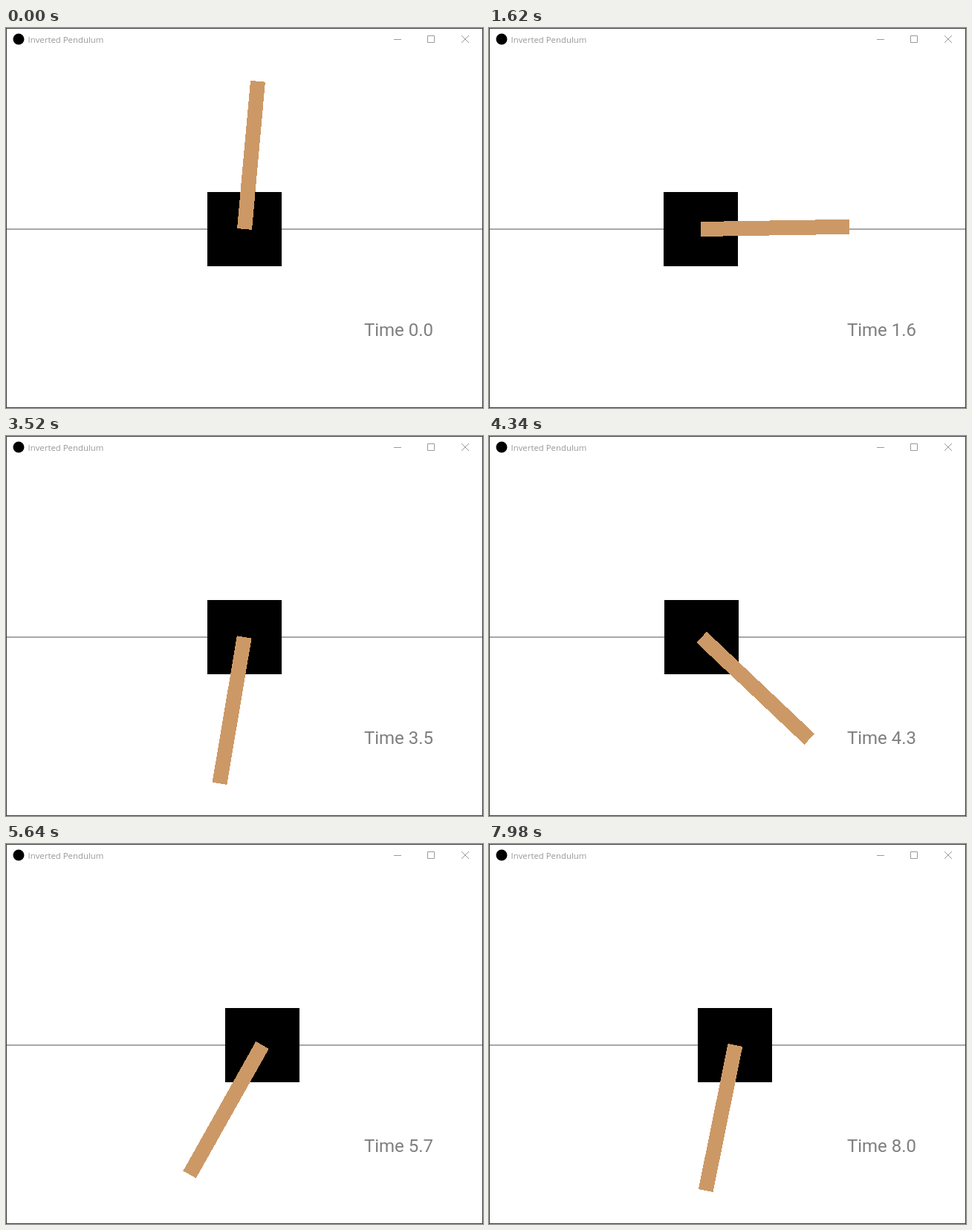
Animation, 642 px wide and 512 px high, one loop 8000 ms. Source, as an HTML page:

```html
<!DOCTYPE html>
<html lang="en">
<head>
<meta charset="utf-8">
<title>Inverted Pendulum</title>
<style>
  html, body { margin: 0; width: 100%; height: 100%; overflow: hidden; background: #fff; }
  svg { display: block; }
  .title { font: 11.4px "Open Sans", sans-serif; fill: #999; }
  .time { font: 24px Roboto, sans-serif; font-kerning: none; fill: #7f7f7f; }
  .outline { fill: none; stroke: #999; }
  .crisp { shape-rendering: crispEdges; }
</style>
</head>
<body>
<svg width="642" height="512" viewBox="0 0 642 512">
  <rect class="crisp" x=".5" y=".5" width="641" height="511" fill="#fff" stroke="#3c3c3c"/>
  <circle cx="17" cy="15" r="7.5"/>
  <text class="title" x="29.5" y="20">Inverted Pendulum</text>
  <path class="outline" d="M522 15.5h10M567.5 10.5h9v9h-9zM613 10l10 10M623 10l-10 10"/>
  <rect class="crisp" x="1" y="270" width="640" height="2" fill="#a8a8a4"/>
  <g id="cart" class="crisp">
    <rect x="-50" y="-50" width="100" height="100"/>
    <rect id="pole" x="-10" y="-200" width="20" height="200" fill="#cc9966"/>
  </g>
  <text id="time" class="time" x="481.9" y="415"></text>
</svg>
<script>
const LOOP = 8000;
const TICK = 20;              // ms, display clock
const TICKS_PER_POSE = 5.049;
const POSE = 0.10098;         // seconds of simulation per drawn pose
const SUBSTEPS = 200;

const LENGTH = 200;           // pole, px
const GRAVITY = 981;          // px/s² at 100 px per metre
const MASS_SHARE = 0.25;      // pole mass / total mass
const CART_DRAG = 0.43;       // 1/s
const POLE_DRAG = 0.45;       // 1/s
const START_ANGLE = 0.09;     // rad from upright

const cart = document.getElementById("cart");
const pole = document.getElementById("pole");
const time = document.getElementById("time");

// Damped pendulum on a free cart, starting at rest
function simulate(count) {
  const poses = [], dt = POSE / SUBSTEPS;
  let x = 0, v = 0, angle = START_ANGLE, spin = 0;
  for (let i = 0; i < count; i++) {
    poses.push({ x, angle });
    for (let j = 0; j < SUBSTEPS; j++) {
      const s = Math.sin(angle), c = Math.cos(angle);
      const torque = (GRAVITY * s + CART_DRAG * v * c) / LENGTH
                   - MASS_SHARE * spin * spin * s * c - POLE_DRAG * spin;
      const spinRate = torque / (1 - MASS_SHARE * c * c);
      const push = MASS_SHARE * LENGTH * (spin * spin * s - spinRate * c);
      v += (push - CART_DRAG * v) * dt;
      spin += spinRate * dt;
      x += v * dt;
      angle += spin * dt;
    }
  }
  return poses;
}

const poses = simulate(80);

function draw() {
  const tick = Math.floor(performance.now() % LOOP / TICK);
  const index = Math.ceil((tick + 0.76) / TICKS_PER_POSE) - 1;
  const { x, angle } = poses[index];
  cart.setAttribute("transform", `translate(${321 + x} 271)`);
  pole.setAttribute("transform", `rotate(${angle * 180 / Math.PI})`);
  time.textContent = "Time " + (index * POSE).toFixed(1);
  requestAnimationFrame(draw);
}
draw();
</script>
</body>
</html>
```
